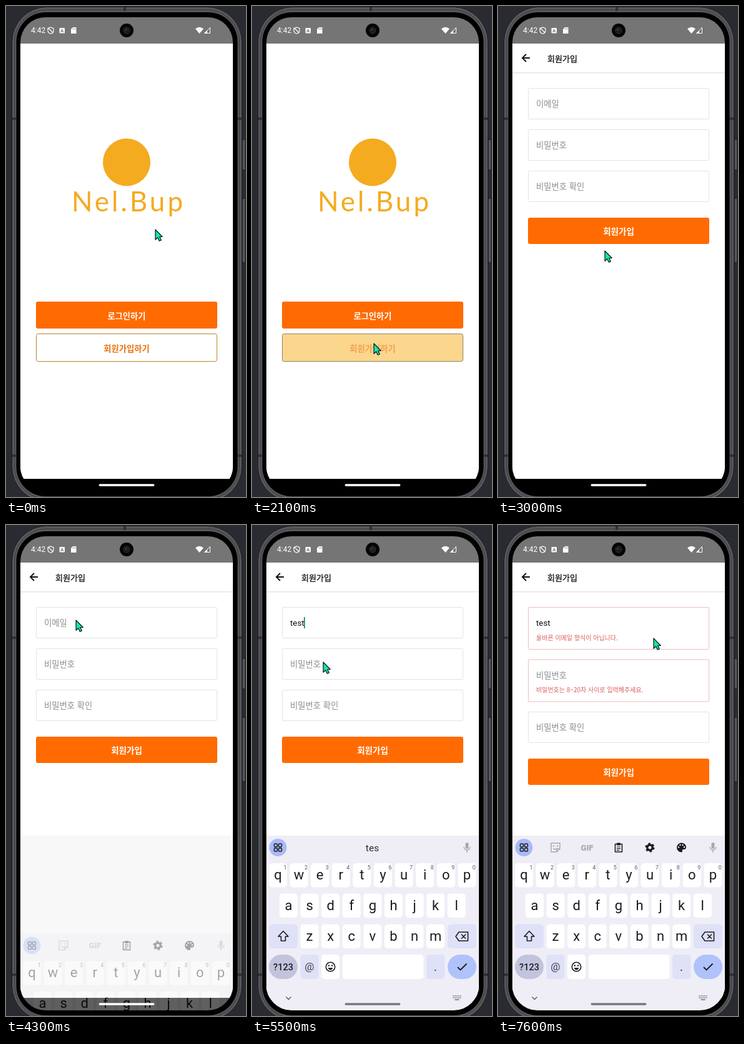
Write an HTML page that moves like this. It is 384x784 px and loops after 8000 ms.

```html
<!DOCTYPE html>
<html lang="ko">
<head>
<meta charset="utf-8">
<style>
html, body { margin: 0; height: 100%; overflow: hidden; background: #2a2b30; }
svg { display: block; width: 100vw; height: 100vh; }
text { font-family: Roboto, "Noto Sans CJK KR", "Noto Sans CJK", sans-serif; white-space: pre; }
.ko { font-family: "Noto Sans CJK KR", "Noto Sans CJK", sans-serif; }
</style>
</head>
<body>
<svg viewBox="0 0 384 784">
  <defs>
    <clipPath id="glass"><rect x="23" y="18" width="340" height="757" rx="40"/></clipPath>
  </defs>
  <rect width="384" height="784" fill="#2a2b30"/>
  <rect x="378" y="213" width="5" height="49" rx="2" fill="#55565a" stroke="#17181a"/>
  <rect x="378" y="307" width="5" height="103" rx="2" fill="#55565a" stroke="#17181a"/>
  <rect x="9.5" y="1.5" width="368" height="790" rx="56" fill="#56575a" stroke="#1a1b1d"/>
  <rect x="13.5" y="6" width="360" height="781" rx="52" fill="none" stroke="#38393c"/>
  <path d="M10 180h6M10 718h6M371 180h6M371 718h6M190 2v6" stroke="#303134" stroke-width="4"/>
  <rect x="16.5" y="10" width="354" height="773" rx="47" fill="#000"/>
  <g id="screen" clip-path="url(#glass)"></g>
  <circle cx="193" cy="39" r="11" fill="#050505"/>
  <circle cx="193" cy="39" r="5" fill="#191b1c" stroke="#303334"/>
  <circle cx="192" cy="38" r="1.5" fill="#3c4244"/>
  <path id="pointer" d="M0 0V16.200L3.700 12.800 6.300 18.200 9.300 17 6.900 11.500H11.300Z" fill="#12e6ae" stroke="#0a1512" stroke-width="1.2" stroke-linejoin="round"/>
</svg>
<script>
const LOOP = 8000, STEP = 100;
const ORANGE = '#ff6b00', INK = '#1b1c21', GREY = '#a9a9ae';

// Pointer keys: time, x, y
const PATH = [[0, 239, 357], [100, 239, 357], [200, 214, 477], [1400, 214, 477], [1800, 195, 539],
  [2600, 195, 539], [3000, 171, 391], [3300, 104, 154], [3400, 107, 152], [3700, 107, 152],
  [4000, 112, 152], [5100, 112, 152], [5500, 114, 219], [6200, 114, 219], [6700, 103, 157],
  [7100, 103, 157], [7400, 249, 181], [LOOP, 249, 181]];

const clamp = v => Math.max(0, Math.min(1, v));
const rect = (x, y, w, h, r, fill, more = '') =>
  `<rect x="${x}" y="${y}" width="${w}" height="${h}" rx="${r}" fill="${fill}" ${more}/>`;
const text = (s, x, y, size, fill, more = '') =>
  `<text x="${x}" y="${y}" font-size="${size}" fill="${fill}" ${more}>${s}</text>`;
const mid = (s, x, y, size, fill, more = '') => text(s, x, y, size, fill, 'text-anchor="middle" ' + more);
const line = (d, color, w = 1.5, more = '') =>
  `<path d="${d}" fill="none" stroke="${color}" stroke-width="${w}" ${more}/>`;
const solid = (d, color) => `<path d="${d}" fill="${color}"/>`;
const dot = (x, y, r, fill, more = '') => `<circle cx="${x}" cy="${y}" r="${r}" fill="${fill}" ${more}/>`;
const at = (x, y, s) => `<g transform="translate(${x} ${y})">${s}</g>`;
const KO = 'class="ko"', BOLD = 'class="ko" font-weight="700"';

function pointerAt(t) {
  const i = PATH.findIndex(k => k[0] > t), [t0, x0, y0] = PATH[i - 1], [t1, x1, y1] = PATH[i];
  const u = (t - t0) / (t1 - t0);
  return [x0 + (x1 - x0) * u, y0 + (y1 - y0) * u];
}

function statusBar() {
  return rect(23, 18, 340, 42, 0, '#757575') + text('4:42', 40, 43, 12, '#fff') +
    at(71.5, 39, line('M0-5 4.5-3.3V0C4.5 3 2 4.7 0 5.3-2 4.7-4.5 3-4.5 0V-3.3ZM-4-4 4 4', '#fff', 1.2)) +
    rect(85.5, 35, 8.5, 8.5, 1, '#fff') + mid('A', 89.8, 42, 7.5, '#757575', 'font-weight="700"') +
    solid('M107 34h5.5v10h-8.5v-7Z', '#fff') + line('M107.3 35.5v2M109.2 35.5v2M111 35.5v2', '#757575', .8) +
    solid('M303 36.5Q309.5 31 316 36.5L309.5 44Z', '#fff') +
    line('M326.5 34.5V43.5H317.5Z', '#fff', 1) + solid('M322 39V43.5H317.5Z', '#fff');
}

function welcome(pressed) {
  return rect(23, 60, 340, 695, 0, '#fff') + dot(193, 249.5, 38, '#f4ab20') +
    mid('Nel.Bup', 196, 328, 44, '#f4ab20', 'style="font-family:Lato,sans-serif" letter-spacing="4"') +
    rect(48, 472, 290, 43, 3, ORANGE) + mid('로그인하기', 193, 499.5, 13.3, '#fff', BOLD) +
    rect(48.5, 523.5, 289, 44, 3, pressed ? '#fbd68d' : '#fff', `stroke="${pressed ? '#8d8268' : '#b88428'}"`) +
    mid('회원가입하기', 193, 551.5, 13.3, pressed ? '#f2a04e' : '#e8700c', BOLD);
}

function field(y, hint, value, error, caret) {
  const x = value ? 84 : 62;
  return rect(48.5, y + .5, 289, error ? 67 : 49, 1, '#fff', `stroke="${error ? '#f0bcbc' : '#e3e3e3'}"`) +
    (value ? text(value, 61, y + 30, 13.3, '#111') : text(hint, 61, y + 30, 13.3, '#8c8c8c', KO)) +
    (error ? text(error, 61, y + 52.5, 10, '#dc5a5a', KO) : '') +
    (caret ? rect(x - 1 - (value ? (4 - value.length) * 5.5 : 0), y + 16, 1.8, 18, 0, '#1b8a72') : '');
}

function signUp(t, value) {
  const mailError = t >= 5900, passError = t >= 7100, shift = 17.5;
  const blink = start => (t - start) % 1000 < 500;
  const mailCaret = t >= 7100 ? blink(7100) : t >= 5900 ? false : t >= 5000 ? true : t >= 3800 && blink(3800);
  const passCaret = t >= 5900 && t < 7100 && blink(5900);
  const y2 = 197 + mailError * shift, y3 = y2 + 66 + passError * shift, y4 = y3 + 75;
  return rect(23, 60, 340, 695, 0, '#fff') + rect(23, 106, 340, 1, 0, '#e2e2e2') + rect(23, 107, 340, 1, 0, '#f5f5f5') +
    line('M51 83H39.5M45 77 39 83 45 89', '#111', 1.9) +
    text('회원가입', 79, 89, 13, '#151515', 'class="ko" font-weight="500" stroke="#151515" stroke-width=".3"') +
    field(131, '이메일', value, mailError && '올바른 이메일 형식이 아닙니다.', mailCaret) +
    field(y2, '비밀번호', '', passError && '비밀번호는 8~20자 사이로 입력해주세요.', passCaret) +
    field(y3, '비밀번호 확인', '', '', false) +
    rect(48, y4, 290, 42, 3, ORANGE) + mid('회원가입', 193, y4 + 26.5, 13.5, '#fff', BOLD);
}

const clipboard = line('M-5.5-5.5H5.5V7H-5.5Z', INK, 1.6, 'stroke-linejoin="round"') +
  rect(-3, -7.5, 6, 4, 1, INK) + line('M-3-1H3M-3 1.7H3M-3 4.3H1', INK, 1.2);
const mic = rect(-2.5, -8, 5, 10, 2.5, GREY) + line('M-5-1A5 5 0 0 0 5-1M0 4V8', GREY, 1.5);
const apps = dot(0, 0, 14, '#a9baf6') + [[-6, -6], [1, -6], [-6, 1], [1, 1]]
  .map(([x, y]) => rect(x, y, 5, 5, 1.3, 'none', `stroke="${INK}" stroke-width="1.5"`)).join('');
const sticker = line('M-7-7H7V2L2 7H-7ZM7 2H2V7M-3.5 1Q0 5 3 1', GREY, 1.5, 'stroke-linejoin="round"') +
  dot(-3, -2.5, 1.2, GREY) + dot(3, -2.5, 1.2, GREY);
const gear = dot(0, 0, 4.2, 'none', `stroke="${INK}" stroke-width="3.4"`) +
  dot(0, 0, 6.4, 'none', `stroke="${INK}" stroke-width="2.4" stroke-dasharray="3.35"`);
const palette = solid('M0-7.5A7.5 7.5 0 0 0 0 7.5C3 7.5 0 4 2.5 3H5Q7.5 2.5 7.5-1 7-7 0-7.5Z', INK) +
  [[-4.5, -.5], [-2, -4], [2, -4], [4.5, -.8]].map(([x, y]) => dot(x, y, 1.2, '#efeef7')).join('');

function toolbar(mode, word) {
  if (mode == 'clip') return rect(120, 502, 146, 26, 6, '#f9f9fe') + at(131.5, 515, clipboard) +
    line('M146 515H254', INK, 2.6, 'stroke-linecap="round" stroke-dasharray="0 5.1"');
  const ends = at(41.5, 515, apps) + at(344, 515, mic);
  if (mode == 'word') return ends + mid(word, 192.5, 520.5, 15.5, '#2b2c32');
  return ends + at(92, 515, sticker) + mid('GIF', 142.5, 519.5, 13, GREY, 'font-weight="800"') +
    at(193, 515, clipboard) + at(243, 515, gear) + at(293.5, 515, palette);
}

function keyboard(mode, word) {
  const plain = mode == 'clip', soft = '#dfe1f8';
  const key = (c, x, y, fill = '#fff') => rect(x - 14.5, y, 29, 38.5, 5, fill) + mid(c, x, y + 26, 22, INK);
  const row = (s, x, y) => [...s].map((c, i) => key(c, x + i * 33.6, y)).join('');
  const hints = [...'1234567890'].map((c, i) => mid(c, 53 + i * 33.6, 550, 9, '#5a5b62')).join('');
  return rect(23, 496, 340, 290, 0, '#efeef7') + toolbar(mode, word) +
    row('qwertyuiop', 41.5, 540) + (plain ? '' : hints) + row('asdfghjkl', 58.5, 588.5) + row('zxcvbnm', 92, 637.5) +
    rect(27, 637.5, 46, 38.5, 5, soft) +
    line('M50 648.5 58 657H53.5V664H46.5V657H42Z', INK, 1.6, 'stroke-linejoin="round"') +
    rect(313, 637.5, 46, 38.5, 5, soft) +
    line('M326 657 331 650H345.5V664H331ZM335 653.5 342 660.5M342 653.5 335 660.5', INK, 1.6, 'stroke-linejoin="round"') +
    rect(27, 686, 46, 39, 19.5, '#c2c3dc') + mid('?123', 50, 711, 14.5, INK, 'font-weight="500"') +
    rect(77.5, 686, 29, 39, 5, soft) + mid(plain ? ',' : '@', 92, 711, plain ? 20 : 17, '#3c3d45') +
    (plain ? rect(111, 686, 163.5, 39, 5, '#fff') : rect(111, 686, 29, 39, 5, '#fff') + rect(145, 686, 129.5, 39, 5, '#fff') +
      at(125.5, 705.5, dot(0, 0, 7.2, 'none', `stroke="${INK}" stroke-width="1.6"`) + dot(-2.6, -2, 1.2, INK) +
        dot(2.6, -2, 1.2, INK) + solid('M-4 1.5H4Q2.5 5 0 5T-4 1.5Z', INK))) +
    rect(279, 686, 29.5, 39, 5, soft) + mid('.', 293.5, 712, 20, '#3c3d45') +
    rect(313, 686, 46, 39, 19.5, '#b0c2fc') + line('M329 706 333.5 710.5 343.5 700.5', INK, 1.9) +
    line('M54.5 753.5 58.5 757.5 62.5 753.5', '#55565c', 1.3) +
    line('M321.5 752H334.5M321.5 755H334.5', '#6b6c72', 1.7, 'stroke-dasharray="1.7 1.1"') + line('M324.5 758H331.5', '#6b6c72', 1.4);
}

// Scale an element about the centre of the page
const zoom = (s, k, opacity) =>
  `<g opacity="${opacity}" transform="translate(193 407) scale(${k}) translate(-193 -407)">${s}</g>`;

function draw(t) {
  const typed = 'test'.slice(0, t < 5000 ? 0 : 1 + Math.floor((t - 5000) / 130));
  const word = t < 5700 ? typed.slice(0, 3) : typed;
  const go = 1 - (1 - clamp((t - 2500) / 400)) ** 3;
  const up = 1 - (1 - clamp((t - 4250) / 285)) ** 3;
  const mode = t >= 7200 || t < 5000 ? 'icons' : t >= 6000 ? 'clip' : 'word';
  let s = rect(23, 60, 340, 695, 0, '#fff');
  if (go < 1) s += zoom(welcome(t >= 2100 && t < 2600), 1 + .05 * go, 1);
  if (go > 0) s += zoom(signUp(t, typed), .85 + .15 * go, clamp((go - .5) / .375));
  s += rect(23, 755, 340, 30, 0, '#000');
  if (t >= 4200) s += rect(23, 496, 340, 259, 0, '#f8f8f8');
  if (up > 0) s += `<g opacity="${up ** 1.2}" transform="translate(0 ${279 * (1 - up)})">${keyboard(mode, word)}</g>`;
  s += rect(148.5, 763.2, 89, 3.6, 1.8, up > .5 ? '#77777c' : '#fff') + statusBar();
  document.getElementById('screen').innerHTML = s;
  document.getElementById('pointer').setAttribute('transform', `translate(${pointerAt(t)})`);
}

let last = -1;
const start = performance.now();
function tick() {
  const t = Math.floor((performance.now() - start) % LOOP / STEP) * STEP;
  if (t !== last) draw(last = t);
  requestAnimationFrame(tick);
}
tick();
</script>
</body>
</html>
```
